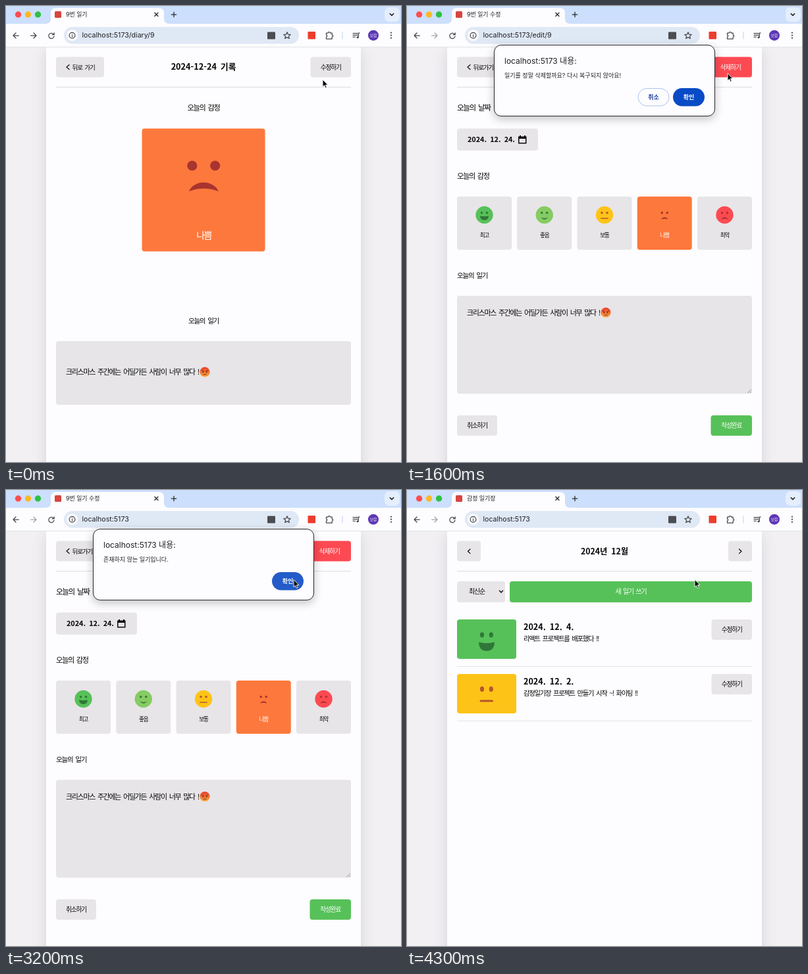
These frames come from a looping animation (600x694 px, 4600 ms). An HTML page:

```html
<!DOCTYPE html>
<html lang="ko">
<head>
<meta charset="utf-8">
<title>감정 일기장</title>
<style>
  html, body { margin: 0; width: 100%; height: 100%; overflow: hidden; background: #f2f0f3; }
  svg { position: absolute; left: 0; top: 0; display: block; overflow: visible; }
  text { font-family: Inter, "Noto Sans CJK KR", "Noto Sans CJK JP", "Noto Sans CJK", sans-serif; fill: #1f2024; white-space: pre; }
  .hand { font-family: "Noto Sans CJK KR", "Noto Sans CJK JP", "Noto Sans CJK", sans-serif; font-weight: 500; letter-spacing: -.12em; word-spacing: .2em; fill: #050505; }
  .num { font-weight: 700; letter-spacing: 0; }
  .bold { font-weight: 700; }
  .icon { fill: none; stroke: #45474b; stroke-width: 1.25; stroke-linecap: round; stroke-linejoin: round; }
  #dialog { position: absolute; left: 132px; top: 59px; width: 336px; height: 109px; }
  #panel, #message { transform-origin: 50% 100%; }
  #panel { position: absolute; inset: 0; box-sizing: border-box; border: 1px solid; border-radius: 11px; }
</style>
</head>
<body>
<svg id="stage" width="600" height="694" viewBox="0 0 600 694"></svg>
<div id="dialog"><div id="panel"></div><svg id="message" width="336" height="109" viewBox="132 59 336 109"></svg></div>
<svg id="pointer" width="600" height="694" viewBox="0 0 600 694"></svg>
<script>
const LOOP = 4600, STEP = 100;
const GREY = '#e7e5e8', GREEN = '#57c159', LIME = '#85cc63', YELLOW = '#fdc417', ORANGE = '#fd783c', RED = '#fd4a52';
const DARK_GREEN = '#2f7738', DARK_RED = '#a83330';
const $ = id => document.getElementById(id);

const rect = (x, y, w, h, fill, r = 4) => `<rect x="${x}" y="${y}" width="${w}" height="${h}" rx="${r}" fill="${fill}"/>`;
const oval = (x, y, rx, fill, ry = rx) => `<ellipse cx="${x}" cy="${y}" rx="${rx}" ry="${ry}" fill="${fill}"/>`;
const path = (d, fill) => `<path d="${d}" fill="${fill}"/>`;
const icon = (d, extra = '') => `<path class="icon" d="${d}" ${extra}/>`;
const text = (x, y, size, str, { cls = '', anchor = 'start', fill, id } = {}) =>
  `<text${id ? ` id="${id}"` : ''} x="${x}" y="${y}" font-size="${size}" class="${cls}" text-anchor="${anchor}"${fill ? ` style="fill:${fill}"` : ''}>${str}</text>`;
const hand = (x, y, size, str, fill, anchor) =>
  text(x, y, size, str, { cls: /\d/.test(str) ? 'hand num' : 'hand', fill, anchor });
const handMid = (x, y, size, str, fill) => hand(x, y, size, str, fill, 'middle');
const rule = (y, color = '#dcdbde') => rect(76, y, 448, 1, color, 0);
const button = (x, y, w, label, fill = GREY, ink) => rect(x, y, w, 31, fill) + handMid(x + w / 2, y + 19, 9.7, label, ink);

function backButton(w, label) {
  return rect(76, 77.5, w, 31, GREY) + icon('M96 89.5L92 93L96 96.5', 'style="stroke:#111"') + hand(100.5, 96.5, 9.6, label);
}

function angryEmoji(x, y) {
  return `<g transform="translate(${x} ${y})">${oval(0, 0, 7.6, 'url(#anger)')}
    <path d="M-5 -2.6L-1.5 -.8M5 -2.6L1.5 -.8" stroke="#6b2c14" stroke-width="1" stroke-linecap="round"/>
    ${oval(-2.7, .3, .9, '#5a2411')}${oval(2.7, .3, .9, '#5a2411')}
    <path d="M-2.2 4.2Q0 2.4 2.2 4.2" fill="none" stroke="#5a2411" stroke-width=".9" stroke-linecap="round"/></g>`;
}

// Moods from best to worst, drawn around the face centre.
const frown = path('M-5 6.7C-3.2 2.4 3.2 2.4 5 6.7Q0 4.7 -5 6.7Z', DARK_RED);
const moods = [
  { name: '최고', color: GREEN, ink: DARK_GREEN, mouth: path('M-6.5 1.5Q0 3 6.5 1.5Q6.3 8 0 8Q-6.3 8 -6.5 1.5Z', DARK_GREEN) },
  { name: '좋음', color: LIME, ink: '#3a783b', mouth: path('M-5.5 3.6Q0 6.4 5.5 3.6Q0 10.5 -5.5 3.6Z', '#3a783b') },
  { name: '보통', color: YELLOW, ink: '#b45a2c', mouth: rect(-5.8, 4.4, 11.6, 1.5, '#b45a2c', .7) },
  { name: '나쁨', color: ORANGE, ink: DARK_RED, mouth: frown },
  { name: '최악', color: RED, ink: DARK_RED, mouth: frown }
];

function moodCard(mood, i) {
  const x = 76 + i * 91.25, mid = x + 41.5, chosen = i === 3;
  return rect(x, 290, 83, 81, chosen ? ORANGE : GREY) +
    `<g transform="translate(${mid} 318)">${oval(0, 0, 13.2, mood.color)}
    ${oval(-4, -3.2, 1.8, mood.ink)}${oval(4, -3.2, 1.8, mood.ink)}${mood.mouth}</g>` +
    handMid(mid, 352, 8.6, mood.name, chosen ? '#fff' : '');
}

const diaryText = '크리스마스 주간에는 어딜가든 사람이 너무 많다 !';

const diaryPage = backButton(73, '뒤로 가기') +
  handMid(300, 97, 12.7, '2024-12-24 기록') + button(462.5, 77.5, 61.5, '수정하기') + rule(123) +
  handMid(300, 159, 11.2, '오늘의 감정') + rect(206.5, 186.5, 187, 187, ORANGE) +
  oval(282.8, 243, 7.6, DARK_RED) + oval(317.6, 243, 7.6, DARK_RED) +
  path('M278 282C286 264 314 264 323 282Q300 273.5 278 282Z', DARK_RED) +
  handMid(300.5, 353.5, 14, '나쁨', '#fff') +
  handMid(300, 482.5, 10.6, '오늘의 일기') + rect(76, 510, 448, 97, GREY) +
  hand(91, 561, 11, diaryText) + angryEmoji(302, 557);

const editPage = backButton(70, '뒤로가기') +
  handMid(300, 97.5, 13.3, '일기 수정하기') + button(458.5, 77.5, 65.5, '삭제하기', RED, '#fff') + rule(123) +
  hand(76, 158.5, 11.6, '오늘의 날짜') + rect(76, 186.5, 123, 33.5, GREY) + hand(92, 206.5, 10.8, '2024. 12. 24.') +
  path('M169 198.5H171V197H173V198.5H178V197H180V198.5H181.5V209.5H169ZM170.5 202V208H180V202Z', '#0a0a0a') +
  hand(76, 263, 11.2, '오늘의 감정') + moods.map(moodCard).join('') +
  hand(76, 413.5, 10.6, '오늘의 일기') + rect(76, 441, 448, 149, GREY) +
  hand(91, 471, 11, diaryText) + angryEmoji(302, 466.5) +
  '<path d="M517.5 589L523 583.5M521 589L523 587" stroke="#77767a" stroke-width=".8"/>' +
  button(76, 623, 61, '취소하기') + button(461.5, 623, 62.5, '작성완료', GREEN, '#fff');

function entry(y, color, face, date, note) {
  return rect(76, y, 90, 60, color) + face + hand(177, y + 15.5, 12.6, date) +
    hand(177, y + 33, 10.3, note) + button(462.5, y, 61.5, '수정하기') + rule(y + 71, '#e6e4e7');
}
const eyes = (y, ink) => oval(114, y, 3.1, ink, 4.1) + oval(127.8, y, 3.1, ink, 4.1);

const homePage = rect(76, 77.5, 36, 31, GREY) + rect(488, 77.5, 36, 31, GREY) +
  icon('M96 90L92.5 93.3L96 96.6M504.5 90L508 93.3L504.5 96.6', 'style="stroke:#111"') +
  handMid(300, 97.5, 12.3, '2024년 12월') + rule(123) +
  rect(76, 139, 73, 32, GREY) + hand(94, 158, 10, '최신순') + icon('M140.5 153.3L143 156L145.5 153.3', 'style="stroke:#111;stroke-width:1.5"') +
  rect(156, 139, 368, 32, GREEN) + handMid(340, 158.3, 10, '새 일기 쓰기', '#fff') +
  entry(197, GREEN, eyes(220.5, DARK_GREEN) + path('M109 231.5Q121 235 133 231.5Q132.5 245 121 245Q109.5 245 109 231.5Z', DARK_GREEN),
    '2024. 12. 4.', '리액트 프로젝트를 배포했다 !!') +
  entry(280, YELLOW, eyes(303, '#b4552c') + rect(110.5, 319.5, 20.5, 3, '#b4552c', 1.5),
    '2024. 12. 2.', '감정일기장 프로젝트 만들기 시작 ~! 화이팅 !!');

const chrome = rect(0, 0, 600, 28, '#ccdffc', 0) +
  path('M60 27Q68 27 68 19V11Q68 3 76 3H232Q240 3 240 11V19Q240 27 248 27Z', '#fdfcfe') +
  rect(0, 27, 600, 35.5, '#fdfcfe', 0) + rect(0, 62, 600, 1, '#dfe3ea', 0) +
  oval(18.5, 13, 4.7, '#fc4d50') + oval(33.5, 13, 4.7, '#fbb923') + oval(48.5, 13, 4.7, '#2dc143') +
  rect(74, 8, 10, 10, '#d8453f', 1.5) +
  icon('M225.8 10.3L231 15.5M231 10.3L225.8 15.5M251.3 13H258.7M255 9.3V16.7', 'style="stroke:#27282b"') +
  rect(575, 2, 23, 22, '#e4eefd', 7) + icon('M583.3 11.7L586 14.4L588.7 11.7', 'style="stroke:#222;stroke-width:1.6"') +
  icon('M19.3 45H11M15 41L11 45L15 49M72.4 43.2A4.1 4.1 0 1 0 73 46M73.2 40.8V43.7H70.2') +
  icon('M37.5 45H46M42 41L46 45L42 49', 'id="forward"') +
  rect(88, 32, 357, 25.5, '#dfe8f5', 12.7) + oval(100.5, 44.7, 8.6, '#fdfcfe') +
  '<circle class="icon" cx="100.5" cy="44.7" r="4.4"/>' + icon('M100.5 44.7V46.8M100.5 42.6V42.7') +
  rect(397, 39.5, 12, 11, '#4b4d52', 1) +
  icon('M427 39.8L428.5 43.2L432.2 43.5L429.4 45.9L430.3 49.5L427 47.6L423.7 49.5L424.6 45.9L421.8 43.5L425.5 43.2Z') +
  rect(458.5, 39, 11.5, 11.5, '#ec3d2e', 1) +
  icon('M486.5 41.2H489.2A1.7 1.7 0 0 1 492.6 41.2H495.2V44A1.5 1.5 0 0 1 495.2 47V50H486.5V47A1.6 1.6 0 0 0 486.5 43.9Z') +
  rect(510.5, 39, 1, 11.5, '#bcd4f7', 0) +
  icon('M527 41.5H534M527 44.3H534M527 47.1H530.5M535.3 47.5V41.2H537') + oval(534, 47.8, 1.5, '#45474b') +
  oval(558, 44.7, 8, '#5c37b5') + text(558, 46.8, 5.8, '보람', { anchor: 'middle', fill: '#eee7ff' }) +
  [40.7, 44.7, 48.7].map(y => oval(585, y, 1.1, '#45474b')).join('');

$('stage').innerHTML = `<defs>
  <linearGradient id="anger" x2="0" y2="1"><stop stop-color="#ea3a2c"/><stop offset="1" stop-color="#fdab3c"/></linearGradient>
  <filter id="soft" x="-10%" y="-10%" width="120%" height="120%"><feGaussianBlur stdDeviation="11"/></filter></defs>
  ${rect(0, 0, 600, 694, '#f2f0f3', 0)}
  <g filter="url(#soft)" opacity=".2">${rect(61, 67, 478, 660, '#64646f', 0)}</g>
  ${rect(61, 62, 478, 632, '#fdfcfe', 0)}
  <g id="diary">${diaryPage}</g><g id="edit">${editPage}</g><g id="home">${homePage}</g>
  ${chrome}${text(91, 16, 8.9, '', { id: 'tab' })}${text(115.5, 48.4, 10.6, '', { id: 'url' })}`;

const label = (x, str, fill) => text(x, 142, 9, str, { cls: 'bold', anchor: 'middle', fill });
$('message').innerHTML = text(148, 88, 12, 'localhost:5173 내용:') + text(148, 109.3, 9, '', { id: 'note' }) +
  `<g id="cancel"><rect x="351" y="125.5" width="47" height="26.5" rx="13.2" fill="none" stroke="#a9c3ee"/>${label(374.5, '취소', '#1c3f9f')}</g>
  <rect id="ok" x="404" y="125" width="48" height="27.5" rx="13.7"/>${label(428, '확인', '#fff')}`;

$('pointer').innerHTML = `
  <path id="arrow" d="M0 0V11.2L2.6 8.8L4.3 12.8L6.2 12L4.5 8.1H8Z" fill="#080808" stroke="#fff" stroke-width=".9"/>
  <path id="finger" d="M-1.2 .4Q0 -.8 1.2 .4L2 4.3Q3.3 3.6 4 4.7Q5.2 4.2 5.8 5.4Q7 5.2 7.2 6.6L7 10L6 12.8H.7L-3.2 8Q-3.7 6.3 -2 6.5L-.4 7.6Z" fill="#fff" stroke="#111" stroke-width="1"/>`;

// Pointer path: time, x, y.
const moves = [[0, 481, 112], [300, 487, 102.5], [1800, 487, 102.5], [2300, 437, 136.5], [LOOP, 437, 136.5]];
// Dialog visibility: each value holds until the next time.
const fades = [[0, 0], [1300, .7], [1400, 1], [2700, .82], [2800, .55], [2900, .12], [3000, .6], [3100, 1], [4000, .55], [4100, .12], [4200, 0]];

const held = (table, t) => table.filter(row => row[0] <= t).pop()[1];
const show = (id, on) => $(id).setAttribute('display', on ? 'inline' : 'none');

function pointerAt(t) {
  const i = moves.findIndex((m, n) => t < moves[n + 1][0]);
  const [a, b] = [moves[i], moves[i + 1]];
  const u = (t - a[0]) / (b[0] - a[0]), s = u * u * (3 - 2 * u);
  return [a[1] + (b[1] - a[1]) * s, a[2] + (b[2] - a[2]) * s];
}

// Leans the top edge back while lifting the whole layer.
function lean(id, tilt, lift, stretch, depth) {
  $(id).style.transform = tilt > 0
    ? `translateY(${-lift * tilt}px) scale(${1 - .006 * tilt},${1 + stretch * tilt}) perspective(${depth}px) rotateX(${6 * tilt}deg)` : 'none';
}

function drawDialog(t) {
  const alpha = held(fades, t), tilt = (1 - alpha) / .45, shade = 253 - 43 * Math.min(tilt, 1);
  const second = t >= 3000, solid = Math.max(0, 1 - .75 * tilt);
  $('dialog').style.opacity = alpha;
  lean('panel', tilt, 15, .016, 160);
  lean('message', tilt, 8.5, .02, 410);
  $('panel').style.background = `rgb(${shade},${shade - 1},${shade + 1})`;
  $('panel').style.borderColor = `rgba(40,40,44,${solid})`;
  $('panel').style.boxShadow = `0 4px 14px rgba(0,0,0,${.24 * solid})`;
  $('note').textContent = second ? '존재하지 않는 일기입니다.' : '일기를 정말 삭제할까요? 다시 복구되지 않아요!';
  show('cancel', !second);
  $('ok').setAttribute('fill', t >= 2200 ? '#235bc9' : '#094bc6');
}

function draw(t) {
  const page = t < 500 ? 'diary' : t < 4200 ? 'edit' : 'home';
  for (const id of ['diary', 'edit', 'home']) show(id, id === page);
  $('tab').textContent = t < 700 ? '9번 일기' : t < 4200 ? '9번 일기 수정' : '감정 일기장';
  $('url').textContent = 'localhost:5173' + (page === 'diary' ? '/diary/9' : t < 2800 ? '/edit/9' : '');
  $('forward').style.stroke = page === 'diary' ? '#45474b' : '#a3a4a8';
  drawDialog(t);
  const place = `translate(${pointerAt(t).join(' ')})`, pressing = t >= 200 && t < 1300;
  show('arrow', !pressing);
  show('finger', pressing);
  $('arrow').setAttribute('transform', place);
  $('finger').setAttribute('transform', place);
}

const start = performance.now();
let last = -1;
function tick() {
  const t = Math.floor((performance.now() - start) % LOOP / STEP) * STEP;
  if (t !== last) draw(last = t);
  requestAnimationFrame(tick);
}
tick();
</script>
</body>
</html>
```
